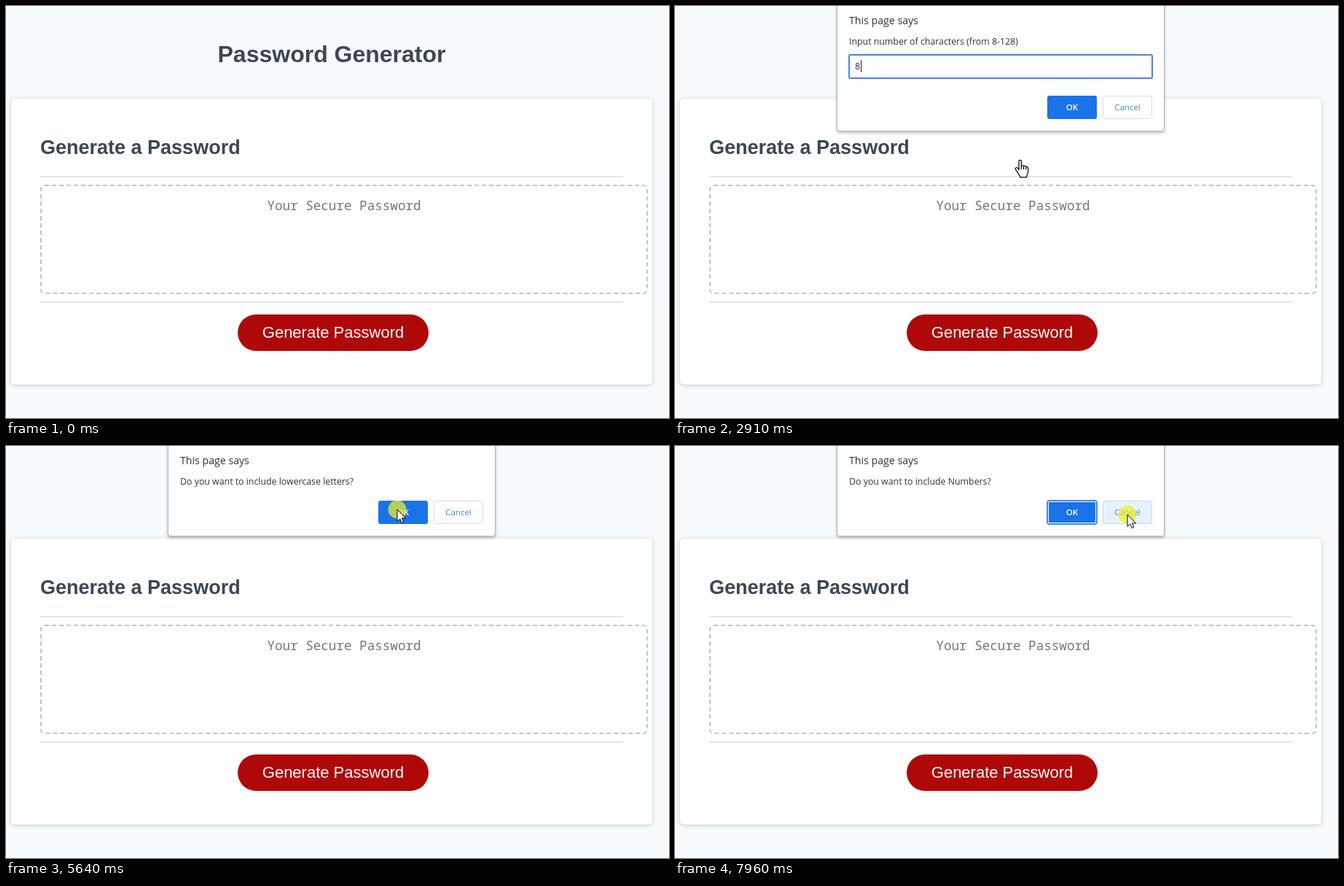
An HTML page for the animation above (8000 ms loop, 910x565 px).

```html
<!DOCTYPE html>
<html lang="en">
<head>
<meta charset="utf-8">
<title>Password Generator</title>
<style>
html, body { margin: 0; width: 100%; height: 100%; overflow: hidden; }
body { position: relative; background: #f7fbfe; color: #3b4753; font-family: "Liberation Sans", Arial, sans-serif; }
body *, .dialog * { position: absolute; box-sizing: border-box; margin: 0; white-space: pre; }
h1, h2 { line-height: 40px; }
h1 { left: 7px; top: 46px; width: 880px; font-size: 32px; text-align: center; }
h2 { left: 47px; top: 174px; font-size: 27px; }
.card { left: 7px; top: 127px; width: 880px; height: 392px; border-radius: 5px; background: #fff; box-shadow: 0 1px 6px rgba(0,0,0,.2); }
.rule { left: 47px; width: 800px; height: 2px; background: #e6e6e8; }
.result { left: 47px; top: 245px; width: 834px; height: 150px; border: 2px dashed #c3c5cb; border-radius: 6px;
  padding-top: 6px; text-align: center; color: #757575; font: 17.6px/40px "Noto Sans Mono", monospace; }
.generate { left: 318px; top: 423px; width: 262px; height: 50px; border-radius: 25px; background: #af0808;
  color: #fff; font-size: 22px; line-height: 50px; text-align: center; }
.dialog { left: 222px; top: -30px; width: 450px; background: #fff; border: 1px solid #b4b6b8; border-radius: 0 0 4px 4px;
  box-shadow: 0 2px 4px rgba(0,0,0,.28); color: #303236; font: 12.35px/20px "Open Sans", sans-serif; }
.title { left: 16px; top: 39px; font-size: 14.15px; }
.message { left: 16px; top: 68px; }
.ok, .cancel { bottom: 16px; width: 68px; height: 32px; border-radius: 3px; line-height: 32px; text-align: center; font-size: 11.5px; font-weight: 600; }
.ok { left: 288px; background: #1a73e8; color: #fff; }
.ok.ring { box-shadow: inset 0 0 0 1px #3f87ec, inset 0 0 0 2px #fff, 0 0 0 1px #3f87ec; }
.cancel { left: 364px; border: 1px solid #dadce0; line-height: 30px; color: #3b82e0; font-weight: 500; }
.cancel.hover { background: #e9f1fd; border-color: #c8daf4; }
.field { left: 15px; top: 95px; width: 418px; height: 34px; border: 2px solid #4286e4; border-radius: 3px; }
.value { left: 7px; top: 6px; height: 17px; line-height: 17px; }
.caret { top: 6px; width: 1px; height: 17px; background: #222; }
#pointer { left: 0; top: 0; overflow: visible; }
</style>
</head>
<body>
<h1>Password Generator</h1>
<div class="card"></div>
<h2>Generate a Password</h2>
<div class="rule" style="top:233px"></div>
<div class="result">Your Secure Password</div>
<div class="rule" style="top:405px"></div>
<div class="generate">Generate Password</div>
<svg id="pointer" width="1" height="1" stroke="#000" fill="#fff" stroke-linejoin="round">
  <circle id="flash" r="12.5" fill="#e8ee2a" stroke="none"/>
  <path id="arrow" d="M0 0V16.5L3.8 13 6.2 18.5 8.7 17.4 6.4 12H11.5z"/>
  <path id="hand" stroke-width="1.2" d="M-2 14V2a1.7 1.7 0 0 1 3.4 0V9q0-1.5 1.6-1.5t1.6 1.8q0-1 1.6-1t1.6 1.8q.2-.8 1.4-.8t1.4 2v5q0 3-2 5.5v2h-9v-1.5q-1.5-1.5-3-4.5l-3-4.5q-1-2 .6-2.6t3 1.6zM1.4 9v4M4.6 9.3v3.7M7.8 10.1v3"/>
</svg>
<script>
const LOOP = 8000, STEP = 70, FADE = 200;
const anchors = [0, 130, 820, 1160, 1500, 2910, 3510, 4330, 4890, 5160, 5640, 6240, 6720, 7060, 7540];
const clicks = [820, 4330, 5640, 6720, 7960];
// Pointer stops: time, x, y
const path = [
  [130, 760, 522], [620, 472, 450], [1430, 472, 450], [1850, 474, 211],
  [3440, 474, 211], [3790, 840, 152], [4260, 540, 147], [5090, 540, 147],
  [5440, 537, 87], [6380, 537, 87], [6450, 542, 94], [7470, 542, 94], [7890, 621, 94]
];
const $ = id => document.getElementById(id);
const pointer = $('pointer');

function makeDialog(message, height, open, press, close, field = '') {
  const box = document.createElement('div');
  box.className = 'dialog';
  box.style.height = height + 30 + 'px';
  box.innerHTML = `<div class="title">This page says</div><div class="message">${message}</div>${field}
    <div class="ok">OK</div><div class="cancel">Cancel</div>`;
  document.body.insertBefore(box, pointer);
  return { box, open, press, close, field, ok: box.querySelector('.ok'), cancel: box.querySelector('.cancel') };
}

const dialogs = [
  makeDialog('Input number of characters (from 8-128)', 172, 1052, 4330, 4704,
    '<div class="field"><div class="value"></div><div class="caret"></div></div>'),
  makeDialog('Do you want to include lowercase letters?', 124, 4830, 5640, 6070),
  makeDialog('Do you want to include Uppercase letters?', 124, 6210, 6720, 7006),
  makeDialog('Do you want to include Numbers?', 124, 7180, LOOP, LOOP)
];
const value = document.querySelector('.value'), caret = document.querySelector('.caret');

function pointerAt(t) {
  const i = path.findIndex(p => p[0] > t);
  if (i < 1) return path[i ? path.length - 1 : 0].slice(1);
  const [t0, x0, y0] = path[i - 1], [t1, x1, y1] = path[i];
  const u = (t - t0) / (t1 - t0), e = u * u * (3 - 2 * u);
  return [x0 + (x1 - x0) * e, y0 + (y1 - y0) * e];
}

function drawDialog(d, t, x) {
  const visible = t >= d.open && t < d.close + FADE;
  d.box.style.display = visible ? '' : 'none';
  if (!visible) return;
  const p = Math.min(1, (t - d.open) / FADE), q = Math.max(0, (t - d.close) / FADE);
  const lift = 14 * (q ? q * q : (1 - p) ** 2);
  d.box.style.opacity = q ? 1 - .62 * q * q : Math.min(1, .38 + 1.15 * p);
  d.box.style.transform = lift > .3 ? `translateY(${-lift}px) scale(${1 + lift * .0009})` : '';
  d.ok.classList.toggle('ring', !d.field && t < d.press);
  d.cancel.classList.toggle('hover', x > 587 && t > 7000);
}

function drawField(t) {
  const typed = t >= 2980, selected = t < 2910;
  value.textContent = typed ? '80' : '8';
  value.style.background = selected ? '#a5c8f0' : '';
  caret.style.left = (typed ? 21 : 14.5) + 'px';
  const blink = Math.floor(Math.max(0, t - 2980) / 530) % 2;
  caret.style.display = selected || blink ? 'none' : '';
}

function drawPointer(t, x, y) {
  const overButton = x > 318 && x < 580 && y > 423 && y < 473;
  const overDialog = x > 222 && x < 672 && y < (t < 4704 ? 172 : 124);
  const hand = overButton || (t > 620 && !overDialog);
  pointer.style.display = t < 130 ? 'none' : '';
  pointer.style.transform = `translate(${Math.round(x)}px, ${Math.round(y)}px)`;
  $('hand').style.display = hand ? '' : 'none';
  $('arrow').style.display = hand ? 'none' : '';
  const age = Math.min(...clicks.filter(c => c <= t).map(c => t - c));
  $('flash').style.opacity = Math.max(0, .75 * (1 - age / 210));
}

function frame(now) {
  const time = now % LOOP;
  const anchor = anchors.filter(a => a <= time).pop();
  const t = anchor + Math.floor((time - anchor) / STEP) * STEP;
  const [x, y] = pointerAt(t);
  dialogs.forEach(d => drawDialog(d, t, x));
  drawField(t);
  drawPointer(t, x, y);
  requestAnimationFrame(() => frame(performance.now() - start));
}
const start = performance.now();
frame(0);
</script>
</body>
</html>
```
